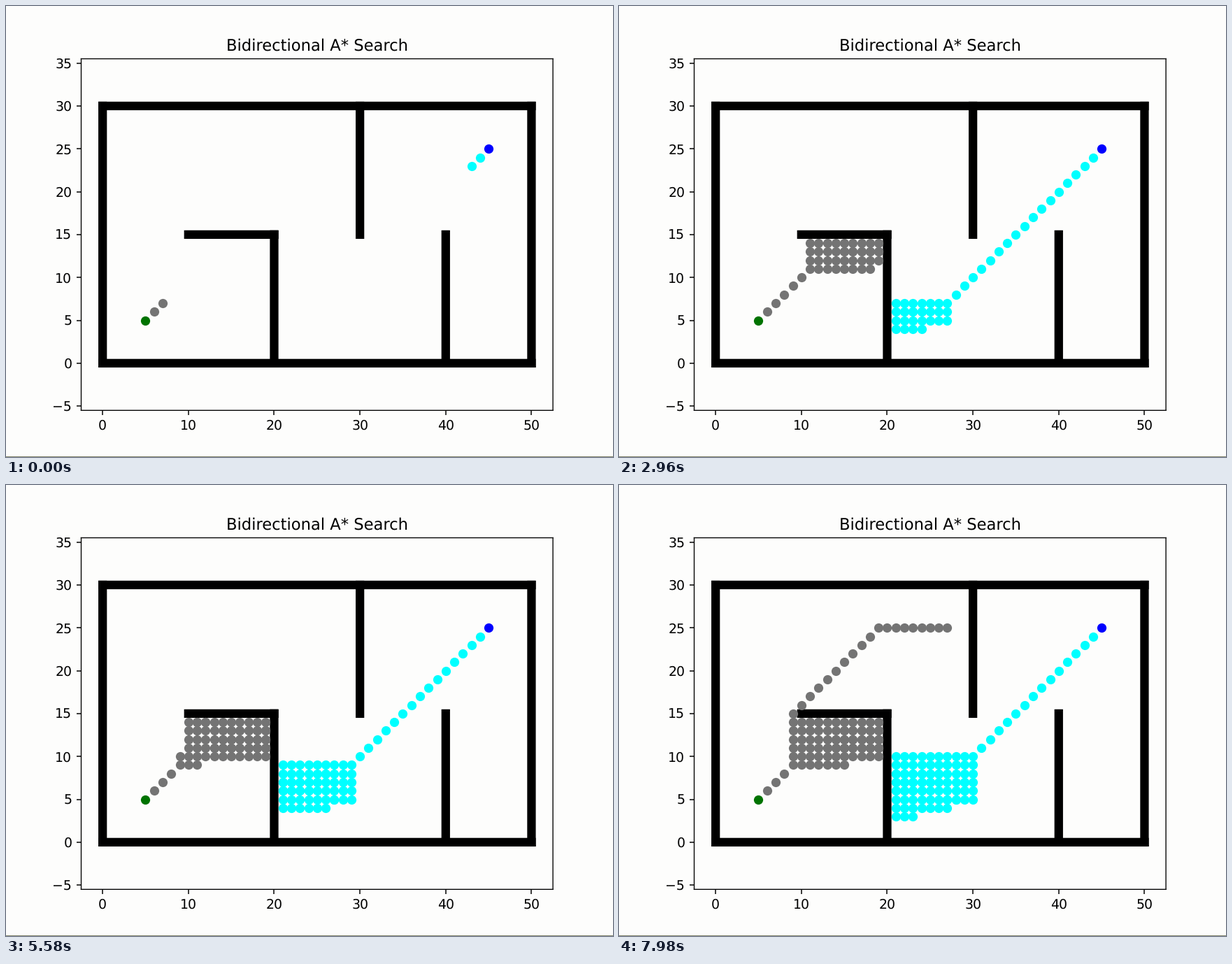
Recreate the animation shown at these times as a matplotlib script. Size 868x645 px, loop 8000 ms.

```python
import itertools
import math

import matplotlib.pyplot as plt
import numpy as np
from matplotlib.animation import FuncAnimation
from matplotlib.patches import Rectangle

plt.rcParams["text.hinting"] = "none"
plt.rcParams["axes.linewidth"] = 0.72

W, H, DPI = 868, 645, 136
TICK, LOOP = 20, 8000
PAPER, GRAY, GREEN = "#fdfdfc", "#747474", "#007300"
START, GOAL = (5, 5), (45, 25)
MOVES = [(-1, -1), (0, -1), (1, -1), (1, 0), (1, 1), (0, 1), (-1, 1), (-1, 0)]

# Each wall runs from one cell to another, both included
WALLS = [((0, 0), (50, 0)), ((0, 30), (50, 30)), ((0, 0), (0, 30)),
         ((50, 0), (50, 30)), ((10, 15), (20, 15)), ((20, 0), (20, 15)),
         ((30, 15), (30, 30)), ((40, 0), (40, 15))]

# Search steps done at certain screen refreshes; drawing slows as dots pile up
REFRESH = [0, 22, 64, 91, 119, 146, 171]
STEPS = [2, 17, 45, 62, 78, 92, 105]


def search_order(start, goal, blocked, steps):
    """Cells in the order A* takes them; outdated queue entries are kept."""
    order = itertools.count()
    cost = {start: 0.0}
    queue = [(0.0, next(order), start)]
    visited = []
    while len(visited) <= steps:
        entry = min(queue)
        queue.remove(entry)
        x, y = cell = entry[2]
        visited.append(cell)
        for dx, dy in MOVES:
            nxt = (x + dx, y + dy)
            if nxt in blocked:
                continue
            new = cost[cell] + math.hypot(dx, dy)
            if new < cost.get(nxt, math.inf) - 1e-9:
                cost[nxt] = new
                rest = abs(goal[0] - nxt[0]) + abs(goal[1] - nxt[1])
                queue.append((round(new + rest, 6), next(order), nxt))
    return np.array(visited[1:])


blocked = {(x, y) for (x0, y0), (x1, y1) in WALLS
           for x in range(x0, x1 + 1) for y in range(y0, y1 + 1)}
fore = search_order(START, GOAL, blocked, STEPS[-1])
back = search_order(GOAL, START, blocked, STEPS[-1])

fig = plt.figure(figsize=(W / DPI, H / DPI), dpi=DPI, facecolor=PAPER)
left, right, top, bottom = 107.5, 782.1, 75.5, 578.3
ax = fig.add_axes([left / W, 1 - bottom / H, (right - left) / W, (bottom - top) / H],
                  facecolor=PAPER)
ax.set_xlim(-2.5, 52.5)
ax.set_ylim(-5.5, 35.5)
ax.set_xticks(range(0, 51, 10))
ax.set_yticks(range(-5, 36, 5))
ax.set_title("Bidirectional A* Search")
for spine in ax.spines.values():
    spine.set_snap(False)

for (x0, y0), (x1, y1) in WALLS:
    ax.add_patch(Rectangle((x0 - 0.5, y0 - 0.5), x1 - x0 + 1, y1 - y0 + 1,
                           color="black", lw=0, snap=False))


def dots(cells, color):
    # Scatter keeps positions between pixels, unlike plot markers
    return ax.scatter(*np.array(cells).T, s=49, color=color, lw=0, zorder=3)


dots([START], GREEN)
dots([GOAL], "blue")
fore_dots = dots(fore, GRAY)
back_dots = dots(back, "cyan")

# Thin edge along the bottom of the window
fig.add_artist(Rectangle((0, 0), 1, 1 / H, transform=fig.transFigure,
                         color="#84876f", lw=0, snap=False))


def refresh_at(ms):
    """Refreshes come in threes, held for 20, 20 and 100 ms."""
    cycle, rest = divmod(ms + 20, 140)
    return 3 * cycle + min(rest // 20, 2) - 1


def update(i):
    done = int(np.interp(refresh_at(i * TICK), REFRESH, STEPS) + 0.4)
    fore_dots.set_offsets(fore[:done])
    back_dots.set_offsets(back[:done])
    return fore_dots, back_dots


anim = FuncAnimation(fig, update, frames=LOOP // TICK, interval=TICK,
                     repeat=True, repeat_delay=0)
plt.show()
```
